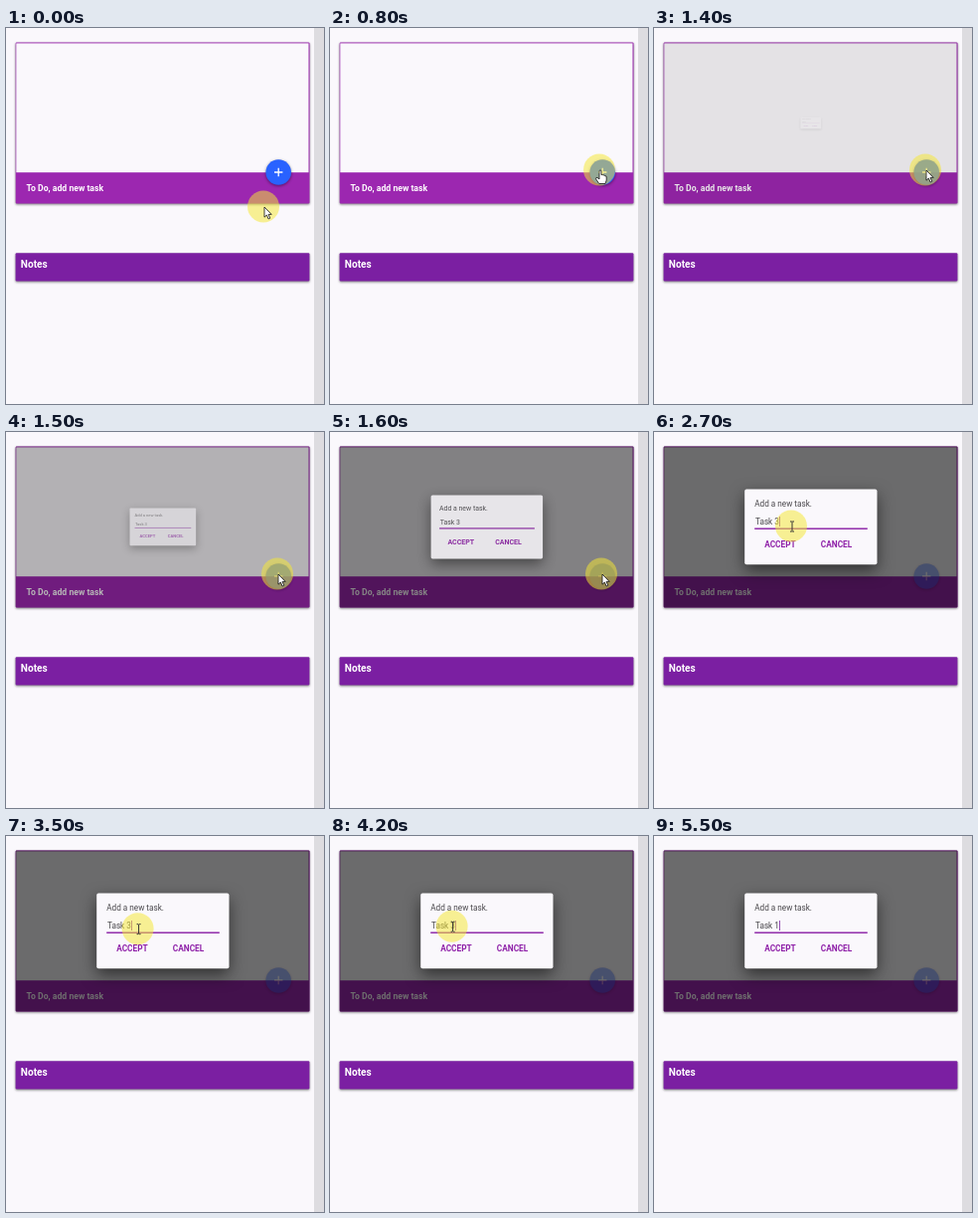
An HTML page for the animation above (8 s loop, 320 by 378 pixels).

```html
<!DOCTYPE html>
<html lang="en">
<head>
<meta charset="utf-8">
<title>Add a task</title>
<style>
  html, body { margin: 0; width: 100%; height: 100%; overflow: hidden; background: #faf8fc; }
  svg { display: block; width: 100vw; height: 100vh; font-family: Roboto, "Noto Sans", sans-serif; }
  .bold { font-weight: 700; }
  .card { filter: drop-shadow(0 1px 1.3px rgba(0, 0, 0, .5)); }
  #fab { filter: drop-shadow(0 1px 1.5px rgba(0, 0, 0, .45)); }
  #dialog { filter: drop-shadow(0 6px 8px rgba(0, 0, 0, .55)); }
  .cursor { stroke: #111; stroke-linejoin: round; fill: #fff; }
</style>
</head>
<body>
<svg viewBox="0 0 320 378">
  <rect width="320" height="378" fill="#faf8fc"/>
  <rect x="310" width="10" height="378" fill="#dddce0"/>

  <g class="card">
    <rect x="9.7" y="14.6" width="295.8" height="161.9" rx="1" fill="#9c27b0"/>
    <rect x="10.3" y="15.4" width="294.2" height="129.8" fill="#faf8fc"/>
  </g>
  <text class="bold" x="20.5" y="163.6" font-size="8.67" fill="#fff">To Do, add new task</text>
  <g id="fab">
    <circle cx="274.2" cy="145" r="12.8" fill="#2962ff"/>
    <path d="M270 145h8.4M274.2 140.8v8.4" stroke="#fff" stroke-width="1.3"/>
  </g>
  <rect id="shade" x="9.7" y="14.6" width="295.8" height="161.9" rx="1"/>

  <g class="card">
    <rect x="9.6" y="226.2" width="295.8" height="28.4" rx="1" fill="#7b1fa2"/>
  </g>
  <text class="bold" x="14.8" y="241" font-size="10.1" fill="#fff">Notes</text>

  <g id="dialog">
    <rect x="91.2" y="57.5" width="133.3" height="75.8" rx="2" fill="#faf8fc"/>
    <g font-size="8.2" fill="#4a484c">
      <text x="101.2" y="75.4">Add a new task.</text>
      <text id="field" x="102" y="93"></text>
    </g>
    <rect x="101.2" y="96.5" width="113.6" height="1.4" fill="#8a1fa5"/>
    <rect id="caret" y="85" width=".8" height="10" fill="#7b1fa2"/>
    <g class="bold" font-size="8.3" fill="#8e1fa8">
      <text x="111.2" y="116.4">ACCEPT</text>
      <text x="167.8" y="116.4">CANCEL</text>
    </g>
  </g>

  <g id="pointer">
    <circle cx="-1" cy="-.5" r="16" fill="#f5e834" fill-opacity=".52"/>
    <path id="arrow" class="cursor" stroke-width=".8"
      d="M0 0V10.2L2.4 8L4.1 12L5.8 11.2L4.1 7.4H7.2Z"/>
    <path id="hand" class="cursor" stroke-width=".8"
      d="M-1 .6Q0 -1 1 .6V4.6Q2.4 3.8 2.9 5Q4.3 4.4 4.7 5.7Q6.3 5.4 6.2 7V10L5 13.5H-1.2L-4.4 8.8Q-4.6 7 -3 7.4L-1 9Z"/>
    <path id="beam" fill="none" stroke="#333" stroke-width="1"
      d="M-2 -5H-.6L0 -4.5L.6 -5H2M0 -4.5V4.5M-2 5H-.6L0 4.5L.6 5H2"/>
  </g>
</svg>
<script>
const LOOP = 8000, STEP = 100;
const $ = id => document.getElementById(id);

// time, x, y of the pointer's hot spot
const path = [
  [100, 260, 180], [800, 272, 143], [1000, 274, 143], [1900, 274, 143],
  [2100, 266, 143], [2400, 199.5, 119.5], [2500, 199.5, 119.5],
  [2600, 121, 90], [2700, 139, 95], [3000, 139, 95], [3200, 135, 94],
  [3400, 135, 94], [4200, 123.6, 91.2], [4900, 123.6, 91.2], [5200, 125, 91.2]
];

const clamp = v => Math.min(1, Math.max(0, v));
const smooth = v => v * v * (3 - 2 * v);
const show = (id, on) => $(id).setAttribute("display", on ? "inline" : "none");

function pointerAt(t) {
  const i = path.findIndex(k => k[0] >= t);
  if (i === 0) return path[0].slice(1);
  if (i < 0) return path[path.length - 1].slice(1);
  const [t0, x0, y0] = path[i - 1], [t1, x1, y1] = path[i];
  const p = (t - t0) / (t1 - t0);
  return [x0 + (x1 - x0) * p, y0 + (y1 - y0) * p];
}

function render(t) {
  const open = smooth(clamp((t - 1300) / 400));
  $("shade").setAttribute("opacity", .57 * open);
  $("fab").setAttribute("opacity", 1 - .6 * open);
  $("dialog").setAttribute("opacity", open);
  $("dialog").setAttribute("transform",
    `translate(157.8 95.4) scale(${open}) translate(-157.8 -95.4)`);

  const digit = t < 5300 ? "3" : t < 5500 ? "" : "1";
  $("field").textContent = "Task " + digit;
  $("caret").setAttribute("x", digit ? 126 : 121.6);
  show("caret", t >= 2700);

  const [x, y] = pointerAt(t);
  $("pointer").setAttribute("transform", `translate(${x} ${y})`);
  show("pointer", t < 5300);
  const kind = t >= 2600 ? "beam" : t >= 700 && t < 1400 ? "hand" : "arrow";
  for (const id of ["arrow", "hand", "beam"]) show(id, id === kind);
}

const start = performance.now();
function tick() {
  const t = (performance.now() - start) % LOOP;
  render(Math.floor(t / STEP) * STEP);
  requestAnimationFrame(tick);
}
tick();
</script>
</body>
</html>
```
